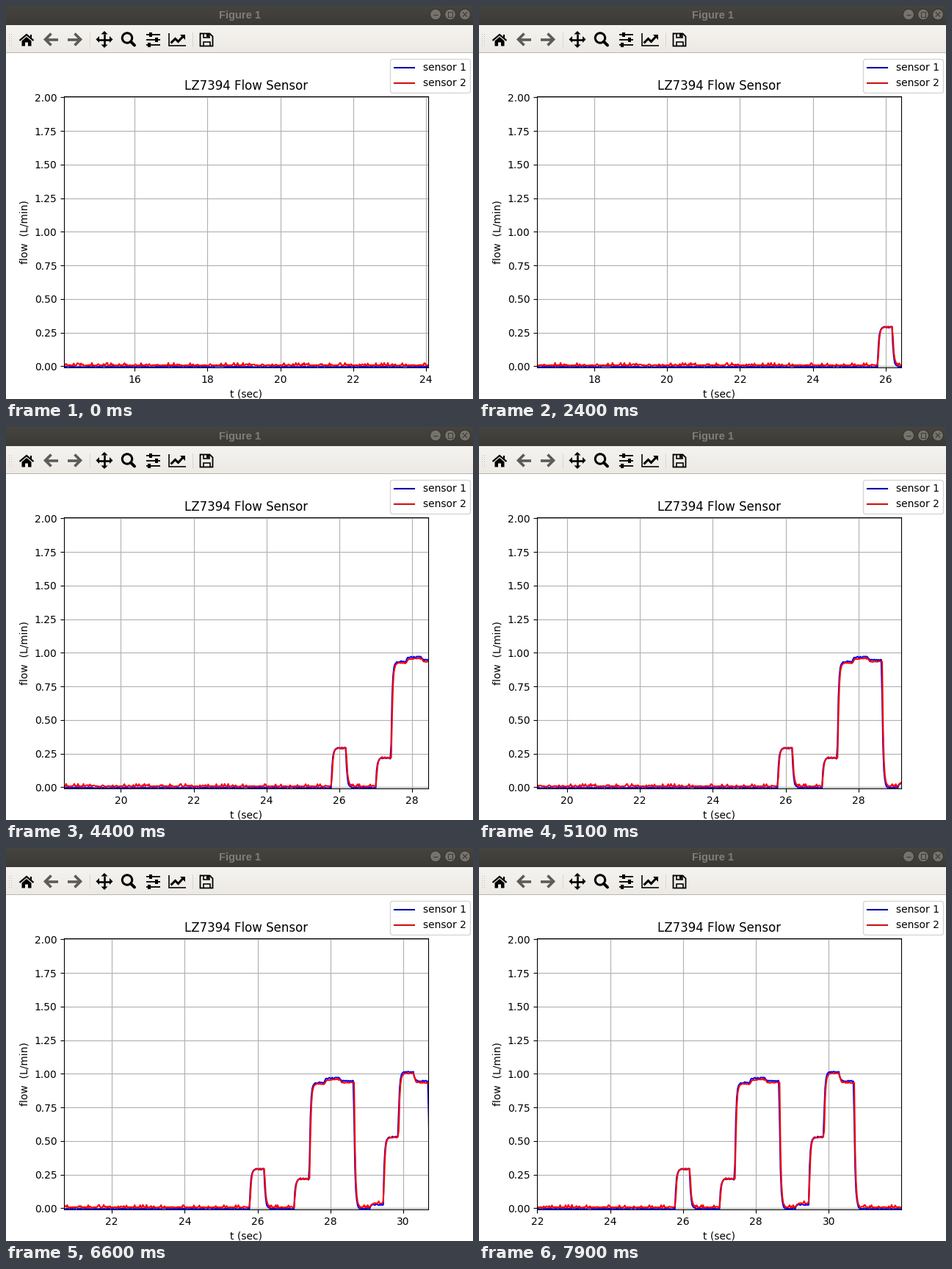
Animation of 636 by 535 pixels, one loop 8000 ms. Source, as a matplotlib script:

```python
import numpy as np
import matplotlib.pyplot as plt
from matplotlib.animation import FuncAnimation
from matplotlib.colors import to_rgb
from matplotlib.lines import Line2D
from matplotlib.patches import Circle, Polygon, Rectangle
from matplotlib.ticker import FormatStrFormatter, MultipleLocator

W, H, DPI = 636, 535, 100
FRAMES, INTERVAL = 80, 100
PX = 72 / DPI  # points per pixel

plt.rcParams["font.family"] = "DejaVu Sans"
fig = plt.figure(figsize=(W / DPI, H / DPI), dpi=DPI, facecolor="white")

# ---- window chrome, in pixel coordinates from the top left ----
ui = fig.add_axes([0, 0, 1, 1], zorder=-1)
ui.axis("off")


def stroke(points, width, color="black", cap="butt"):
    x, y = zip(*points)
    ui.plot(x, y, color=color, lw=width * PX, solid_capstyle=cap,
            solid_joinstyle="miter")


def poly(points, color="black"):
    ui.add_patch(Polygon(points, facecolor=color, lw=0))


def rect(x, y, w, h, color="black"):
    ui.add_patch(Rectangle((x, y), w, h, facecolor=color, lw=0))


def ring(x, y, r, width, edge="black", face="none"):
    ui.add_patch(Circle((x, y), r, facecolor=face, edgecolor=edge,
                        lw=width * PX))


def gradient(y0, y1, top, bottom):
    mix = np.linspace(0, 1, y1 - y0)[:, None, None]
    img = (1 - mix) * np.array(to_rgb(top)) + mix * np.array(to_rgb(bottom))
    ui.imshow(img, extent=(0, W, y1, y0), aspect="auto",
              interpolation="nearest")


def mirror(cx, half):
    """Close a left half outline with its reflection about x = cx."""
    return half + [(2 * cx - x, y) for x, y in reversed(half)]


def title_bar():
    gradient(0, 26, "#45443e", "#3b3a36")
    ui.text(318.5, 16.5, "Figure 1", color="#807d78", ha="center",
            va="baseline", family="Liberation Sans", weight="bold",
            size=14.6 * PX)
    y, r, dark = 11.5, 3.2, "#3f3e39"
    minimise, maximise, close = 585, 605, 625
    for x in (minimise, maximise, close):
        ring(x, y, 7.4, 1, "#34332f", "#75736c")
    stroke([(minimise - r, y), (minimise + r, y)], 1.2, dark)
    ui.add_patch(Rectangle((maximise - r, y - r), 2 * r, 2 * r, fill=False,
                           edgecolor=dark, lw=1.1 * PX))
    for s in (-r, r):
        stroke([(close - r, y - s), (close + r, y + s)], 1.2, dark)


def arrow(tip, side, cy=45.5, color="#5d5b57"):
    head = [(tip + side * (1.5 + abs(d)), cy + d) for d in (-8, 0, 8)]
    stroke(head, 3.6, color)
    stroke([(tip + side * 2, cy), (tip + side * 19, cy)], 3.6, color)


def home(cx):
    stroke(mirror(cx, [(cx - 9.5, 47), (cx, 39)]), 2.2)
    rect(cx + 4.5, 38.5, 2.5, 5.5)
    poly(mirror(cx, [(cx, 42), (cx - 6.5, 47.5), (cx - 6.5, 54.5),
                     (cx - 2, 54.5), (cx - 2, 49.5)]))


def pan(cx, cy=45.5):
    center = np.array([cx, cy])
    for quarter in range(4):
        a = quarter * np.pi / 2
        out = np.array([np.cos(a), np.sin(a)])
        side = np.array([-out[1], out[0]])
        stroke([center, center + 8 * out], 2.6)
        poly([center + 11.5 * out, center + 7 * out - 4.5 * side,
              center + 7 * out + 4.5 * side])


def zoom(cx):
    ring(cx - 2, 43.5, 6.7, 3)
    stroke([(cx + 3, 48.5), (cx + 8, 53.5)], 4, cap="round")


def sliders(cx):
    for y, knob in ((39, cx - 3), (46, cx + 5), (53, cx - 5)):
        stroke([(cx - 9.5, y), (cx + 9.5, y)], 1.8)
        rect(knob - 2.8, y - 3, 5.6, 6, "#f1eeea")
        rect(knob - 1.8, y - 3, 3.6, 6)


def chart(x, y):
    stroke([(x, y - 17), (x, y), (x + 23, y)], 1.6)
    stroke([(x + 2.5, y - 3.5), (x + 8.5, y - 9.5), (x + 12.5, y - 5.5),
            (x + 19, y - 12.5)], 3)
    poly([(x + 14.5, y - 15.5), (x + 21.5, y - 15.5), (x + 21.5, y - 8.5)])


def disk(x, y, s=17):
    stroke([(x, y), (x + s - 4, y), (x + s, y + 4), (x + s, y + s),
            (x, y + s), (x, y - 0.8)], 1.8)
    mid = x + s / 2
    stroke(mirror(mid, [(mid - 4.3, y), (mid - 4.3, y + 5.5)]), 1.6)
    stroke(mirror(mid, [(mid - 4.5, y + s), (mid - 4.5, y + 11)]), 1.6)
    rect(mid, y + 0.5, 2.5, 4)


def toolbar():
    gradient(26, 63, "#f5f3f0", "#edeae5")
    rect(0, 63, W, 1, "#b9b5ac")
    for y in range(38, 54, 3):
        for x in (4, 7):
            rect(x, y, 1, 1, "#c4c0b8")
    for x in (114, 254):
        rect(x, 36, 1, 20, "#dad6cf")
    home(28)
    arrow(52, 1)
    arrow(103, -1)
    pan(134)
    zoom(167)
    sliders(200)
    chart(222, 54)
    disk(264.5, 37.5)


title_bar()
toolbar()
ui.set_xlim(0, W)
ui.set_ylim(H, 0)

# ---- sensor signals: the flow settles quickly on each new level ----
STEPS = [(25.78, 0.29), (26.18, 0), (27.0, 0.215), (27.42, 0.935),
         (27.83, 0.968), (28.25, 0.945), (28.64, 0), (29.08, 0.03),
         (29.45, 0.53), (29.86, 1.016), (30.28, 0.945), (30.69, 0)]
rng = np.random.default_rng(12)
t = np.arange(13.9, 32.3, 0.025)


def flow(lag, tau=0.03):
    y, level = np.zeros_like(t), 0
    for start, target in STEPS:
        dt = np.maximum(t - start - lag, 0)
        y += (target - level) * (1 - np.exp(-dt / tau))
        level = target
    return y


idle = flow(0.012) < 0.06
spikes = rng.choice([0, 0.008, 0.016], t.size, p=[0.82, 0.1, 0.08])
flow1 = flow(0) - 0.004 * idle + rng.choice([-0.003, 0, 0.004], t.size)
flow2 = 0.007 + 0.98 * flow(0.012) + rng.choice([-0.002, 0, 0.002], t.size)
flow2 += spikes * np.where(idle, 1, 0.4)

# ---- plot: a 640 x 480 canvas that overhangs the stage ----
LEFT, BOTTOM = -1, -10
ax = fig.add_axes([(LEFT + 80) / W, (BOTTOM + 52.8) / H, 496 / W, 369.6 / H])
ax.plot(t, flow1, color="blue")
ax.plot(t, flow2, color="red")
ax.grid(True)
ax.set_ylim(-0.01, 2.01)
ax.xaxis.set_major_locator(MultipleLocator(2))
ax.xaxis.set_major_formatter(FormatStrFormatter("%d"))
ax.yaxis.set_major_locator(MultipleLocator(0.25))
ax.yaxis.set_major_formatter(FormatStrFormatter("%.2f"))
ax.set_title("LZ7394 Flow Sensor")
ax.set_xlabel("t (sec)")
ax.set_ylabel("flow  (L/min)")

fig.legend([Line2D([], [], color="#0000a8"), Line2D([], [], color="#cc1010")],
           ["sensor 1", "sensor 2"], loc="upper right",
           bbox_to_anchor=((LEFT + 640) / W, (BOTTOM + 480) / H))


def update(i):
    sec = i * INTERVAL / 1000
    lag = 0.047 * np.exp(-((sec - 3.3) / 1.5) ** 4)  # brief display delay
    start = 14.06 + 1.0038 * sec - lag
    ax.set_xlim(start, start + 10)
    return ax.lines


anim = FuncAnimation(fig, update, frames=FRAMES, interval=INTERVAL,
                     repeat=True, repeat_delay=0, blit=False)
plt.show()
```
